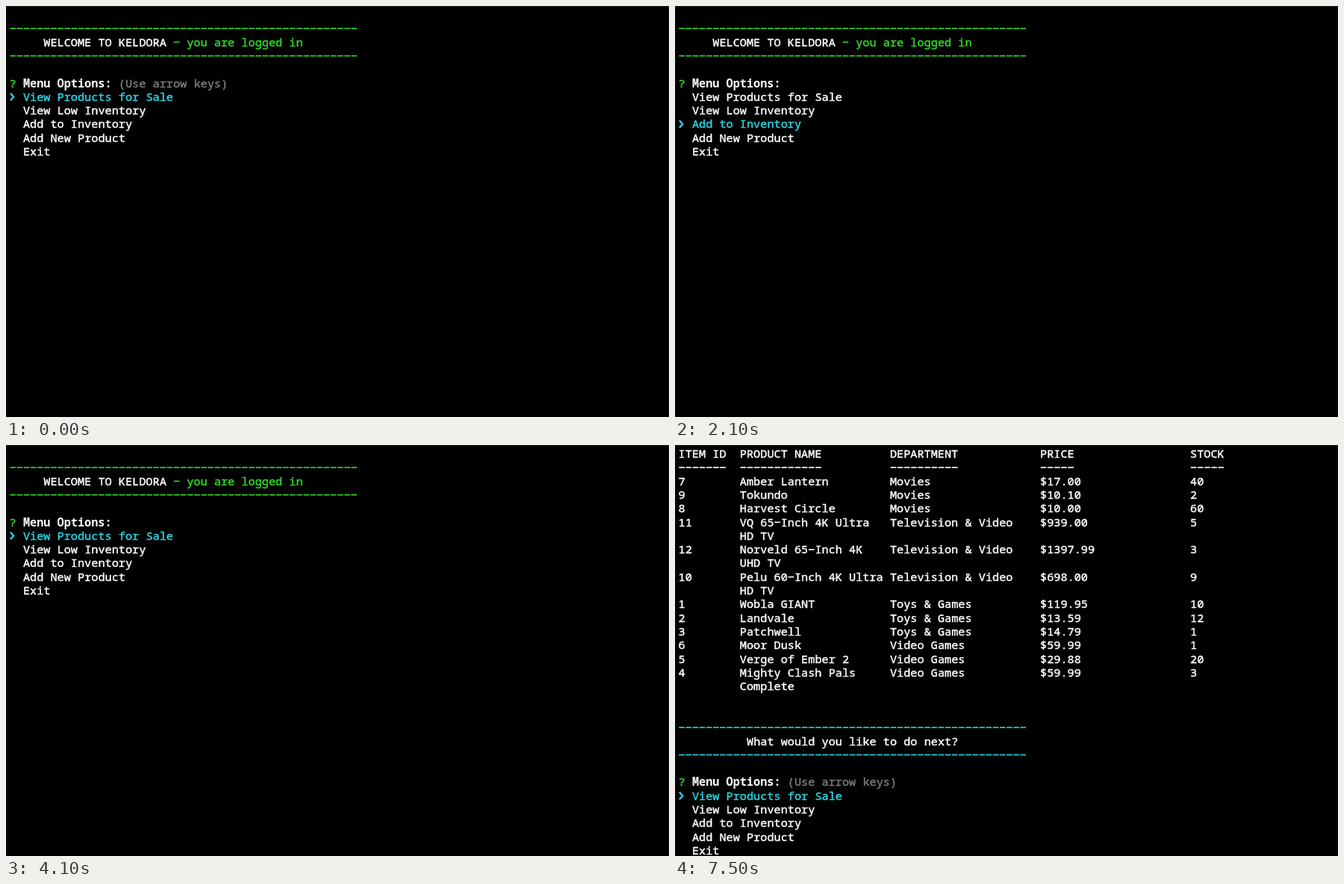
These frames come from a looping animation (888x550 px, 8000 ms). An HTML page with a canvas:

```html
<!DOCTYPE html>
<html lang="en">
<head>
<meta charset="utf-8">
<title>Store manager terminal</title>
<style>
html, body { margin: 0; width: 100%; height: 100%; overflow: hidden; background: #000; }
canvas { display: block; }
</style>
</head>
<body>
<canvas id="stage" width="888" height="550"></canvas>
<script>
const ctx = document.getElementById('stage').getContext('2d');
const LOOP = 8000;
const CELL = 9.14, LINE = 18.31, LEFT = 4.6, MIDDLE = 11.6;
const WHITE = '#fff', GREEN = '#30dc26', CYAN = '#2bd6e4', GREY = '#7b7b7b';
const FACE = '"Noto Sans Mono", "DejaVu Sans Mono", monospace';
const RULE = '-'.repeat(51);

const OPTIONS = ['View Products for Sale', 'View Low Inventory', 'Add to Inventory',
  'Add New Product', 'Exit'];
const COLUMNS = [0, 9, 31, 53, 75];
const HEADINGS = ['ITEM ID', 'PRODUCT NAME', 'DEPARTMENT', 'PRICE', 'STOCK'];
const PRODUCTS = `7|Amber Lantern|Movies|$17.00|40
9|Tokundo|Movies|$10.10|2
8|Harvest Circle|Movies|$10.00|60
11|VQ 65-Inch 4K Ultra|Television & Video|$939.00|5
|HD TV
12|Norveld 65-Inch 4K|Television & Video|$1397.99|3
|UHD TV
10|Pelu 60-Inch 4K Ultra|Television & Video|$698.00|9
|HD TV
1|Wobla GIANT|Toys & Games|$119.95|10
2|Landvale|Toys & Games|$13.59|12
3|Patchwell|Toys & Games|$14.79|1
6|Moor Dusk|Video Games|$59.99|1
5|Verge of Ember 2|Video Games|$29.88|20
4|Mighty Clash Pals|Video Games|$59.99|3
|Complete`.split('\n').map(line => line.split('|'));

// Text sits on the terminal grid; hyphens are wide bars.
// A hairline outline gives regular text its medium weight.
function put(row, col, text, color = WHITE, bold = false) {
  const y = MIDDLE + row * LINE;
  ctx.fillStyle = ctx.strokeStyle = color;
  ctx.lineWidth = 0.45;
  ctx.lineJoin = 'round';
  ctx.font = `${bold ? 700 : 400} 15.23px ${FACE}`;
  for (const { 0: run, index } of text.matchAll(/-|[^\s-]+/g)) {
    const x = LEFT + (col + index) * CELL;
    if (run === '-') {
      ctx.fillRect(x + 0.7, y - 0.6, 7.7, 1.6);
      continue;
    }
    ctx.fillText(run, x, y + 5.4);
    if (!bold) ctx.strokeText(run, x, y + 5.4);
  }
}

function pointer(row) {
  const y = MIDDLE + row * LINE;
  ctx.strokeStyle = CYAN;
  ctx.lineWidth = 2.3;
  ctx.lineJoin = 'miter';
  ctx.beginPath();
  ctx.moveTo(5.9, y - 4.8);
  ctx.lineTo(10.2, y);
  ctx.lineTo(5.9, y + 4.8);
  ctx.stroke();
}

function menu(row, selected, hint) {
  put(row, 0, '?', GREEN);
  put(row, 2, 'Menu Options:', WHITE, true);
  if (hint) put(row, 16, '(Use arrow keys)', GREY);
  OPTIONS.forEach((option, i) => {
    put(row + 1 + i, 2, option, i === selected ? CYAN : WHITE);
  });
  pointer(row + 1 + selected);
}

function banner(row, color) {
  put(row, 0, RULE, color);
  put(row + 2, 0, RULE, color);
}

function welcome(selected, hint) {
  banner(1, GREEN);
  put(2, 5, 'WELCOME TO KELDORA');
  put(2, 24, '- you are logged in', GREEN);
  menu(5, selected, hint);
}

function tableRow(row, cells) {
  cells.forEach((cell, i) => put(row, COLUMNS[i], cell));
}

function products(top) {
  banner(top, CYAN);
  put(top + 1, 17, 'PRODUCTS FOR SALE', CYAN);
  tableRow(top + 4, HEADINGS);
  tableRow(top + 5, HEADINGS.map(text => '-'.repeat(text.length)));
  PRODUCTS.forEach((cells, i) => tableRow(top + 6 + i, cells));
  banner(top + 24, CYAN);
  put(top + 25, 10, 'What would you like to do next?');
  menu(top + 28, 0, true);
}

function border() {
  ctx.fillStyle = '#1d1d1d';
  ctx.fillRect(0, 0, 888, 1);
  ctx.fillStyle = '#141414';
  ctx.fillRect(0, 0, 1, 550);
  ctx.fillRect(887, 0, 1, 550);
}

function draw() {
  const t = performance.now() % LOOP;
  ctx.fillStyle = '#000';
  ctx.fillRect(0, 0, 888, 550);
  if (t < 4500) {
    const step = Math.floor((t + 500) / 1000);
    welcome(2 - Math.abs(step - 2), step === 0);
  } else {
    products(t < 7500 ? 0 : -4);
  }
  border();
  requestAnimationFrame(draw);
}
draw();
</script>
</body>
</html>
```
